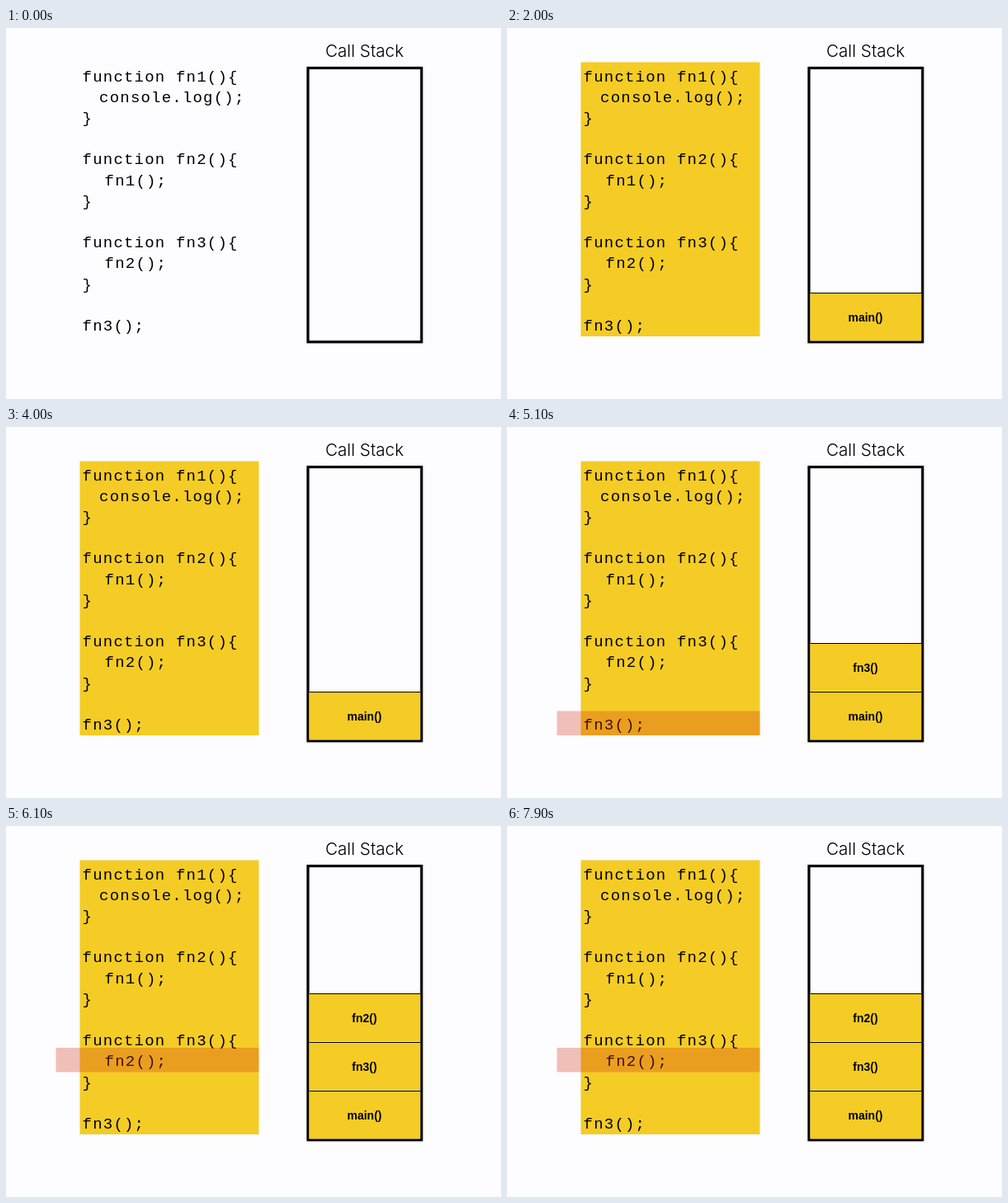
An HTML page for the animation above (8000 ms loop, 600x450 px).

```html
<!DOCTYPE html>
<html lang="en">
<head>
<meta charset="utf-8">
<title>Call stack</title>
<style>
  html, body { margin: 0; width: 100%; height: 100%; overflow: hidden; background: #fdfcff; }
  svg { display: block; width: 600px; height: 450px; }
  text { fill: #000; white-space: pre; }
  .title { font: 300 20.7px Inter, "Liberation Sans", sans-serif; text-anchor: middle; }
  .code { font: 19px "Liberation Mono", monospace; letter-spacing: 1.2px; }
  .label { font: bold 14px "Liberation Sans", sans-serif; text-anchor: middle; }
  .gold { fill: #f4cc25; }
  .mark { fill: rgba(210, 52, 20, .3); }
  .box { fill: none; stroke: #000; stroke-width: 3; filter: drop-shadow(0 .5px .8px rgba(0, 0, 0, .3)); }
</style>
</head>
<body>
<svg id="stage" viewBox="0 0 600 450"></svg>
<script>
const LOOP = 8000;
const stage = document.getElementById('stage');

function add(tag, attrs, content = '') {
  const el = document.createElementNS('http://www.w3.org/2000/svg', tag);
  for (const name in attrs) el.setAttribute(name, attrs[name]);
  el.textContent = content;
  return stage.appendChild(el);
}

const rect = (cls, x, y, width, height) => add('rect', { class: cls, x, y, width, height });
const text = (cls, x, y, content) => add('text', { class: cls, x, y }, content);

// line number, indent in px, code
const code = [
  [0, 0, 'function fn1(){'], [1, 20.5, 'console.log();'], [2, 0, '}'],
  [4, 0, 'function fn2(){'], [5, 27, 'fn1();'], [6, 0, '}'],
  [8, 0, 'function fn3(){'], [9, 27, 'fn2();'], [10, 0, '}'],
  [12, 0, 'fn3();']
];

// calls are pushed at these times; markY is the highlighted line
const calls = [
  { name: 'main()', start: 2000, end: LOOP },
  { name: 'fn3()', start: 4100, end: LOOP, markY: 344.5, markEnd: 6100 },
  { name: 'fn2()', start: 6100, end: LOOP, markY: 269, markEnd: LOOP }
];

const parts = [];
const during = (start, end, ...els) => els.forEach(el => parts.push({ el, start, end }));

during(calls[0].start, LOOP, rect('gold', 89.5, 41.5, 217, 332.5));
for (const [line, indent, content] of code) {
  text('code', 92.6 + indent, 64.8 + line * 25.17, content);
}

text('title', 434.5, 35, 'Call Stack');
rect('box', 366, 48.5, 137.7, 332.3);

calls.forEach(({ name, start, end, markY, markEnd }, i) => {
  const y = 321 - i * 59;
  during(start, end,
    rect('gold', 367.5, y, 134.7, 58.5),
    rect('', 367.5, y, 134.7, 1),
    text('label', 434.5, y + 35.3, name));
  if (markY) during(start, markEnd, rect('mark', 60.5, markY, 246, 29.5));
});

function draw(now) {
  const t = now % LOOP;
  for (const { el, start, end } of parts) {
    el.style.display = t >= start && t < end ? '' : 'none';
  }
}

const origin = performance.now();
function tick() {
  draw(performance.now() - origin);
  requestAnimationFrame(tick);
}
tick();
</script>
</body>
</html>
```
